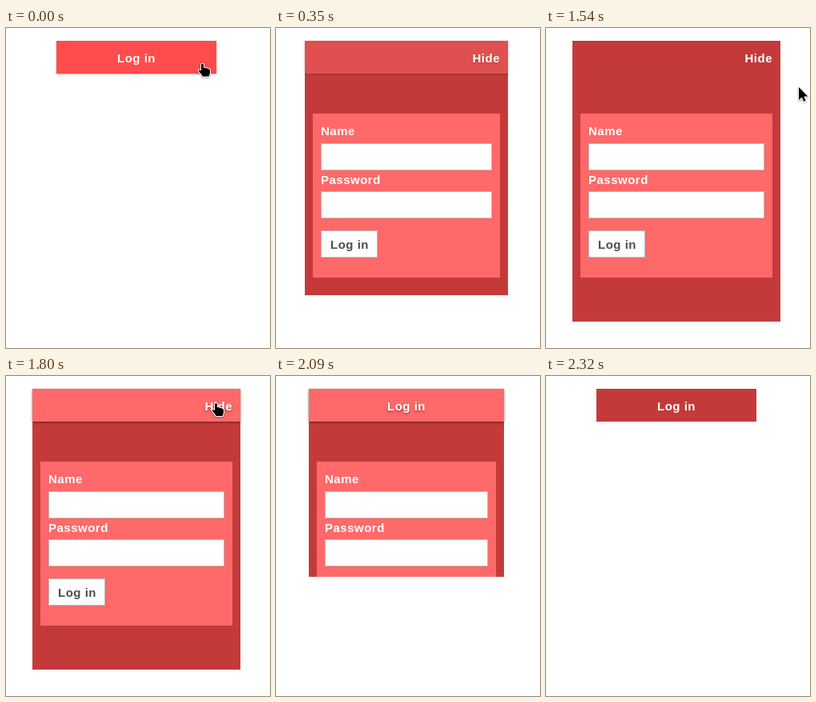
These frames come from a looping animation (330x400 px, 3860 ms). An HTML page:

```html
<!DOCTYPE html>
<html lang="en">
<head>
<meta charset="utf-8">
<title>Login panel</title>
<style>
  html, body { margin: 0; width: 100%; height: 100%; overflow: hidden; background: #fff; }
  body { position: relative; font: bold 15px/20px "Liberation Sans", Arial, sans-serif; letter-spacing: .5px; color: #fff; }
  div, svg { position: absolute; box-sizing: border-box; white-space: nowrap; }
  #panel { top: 16px; background: #c43a3a; overflow: hidden; }
  #header { top: 16px; height: 41px; padding: 12px 10px 0; }
  #form { left: 10px; right: 10px; top: 91px; height: 205px; background: #ff6969; }
  .label, .field, .button { left: 10px; }
  .field { right: 10px; height: 34px; background: #fff; border: 1px solid #bbb; }
  .button { top: 146px; width: 71px; height: 34px; padding: 7px 0 0 11px; background: #fff; border: 1px solid #bbb; color: #4d4d4d; }
  svg { left: 0; top: 0; }
  path { stroke: #fff; stroke-width: 2; stroke-linejoin: round; paint-order: stroke; filter: drop-shadow(0 1px 1px rgba(0,0,0,.35)); }
</style>
</head>
<body>
<div id="panel">
  <div id="form">
    <div class="label" style="top:12px">Name</div>
    <div class="field" style="top:37px"></div>
    <div class="label" style="top:73px">Password</div>
    <div class="field" style="top:97px"></div>
    <div class="button">Log in</div>
  </div>
</div>
<div id="header"></div>
<svg width="330" height="400">
  <path id="arrow" d="M0 0V16L3.8 12.4L6.2 17.8L8.6 16.8L6.3 11.6H11.4Z"/>
  <path id="hand" d="M-1.5 8.5V1C-1.5-.7 1.5-.7 1.5 1V5C2.5 4.3 4.1 4.5 4.4 5.5C5.5 4.9 6.8 5.3 7.1 6.2C8.5 5.9 9.5 6.8 9.5 8.1V10.5C9.5 12.5 8.5 13.5 8.1 15.5H0C-.5 13.5-2.5 12-4 9.8C-5.5 7.7-3.5 6.5-1.5 8.5Z"/>
</svg>
<script>
const LOOP = 3860;
// The picture only changes at these moments.
const STEPS = [0, 40, 80, 250, 300, 350, 390, 440,
  1540, 1580, 1630, 1670, 1710, 1760, 1800,
  1990, 2040, 2090, 2140, 2180, 2230, 2280, 2320];
const BRIGHT = [255, 77, 77], DARK = [196, 58, 58], LIT = [255, 105, 105];

const [panel, header, arrow, hand] =
  ["panel", "header", "arrow", "hand"].map(id => document.getElementById(id));

const progress = (t, from, to) => Math.min(1, Math.max(0, (t - from) / (to - from)));
const lerp = (a, b, p) => a + (b - a) * p;

// cubic-bezier(.25, .1, .25, 1)
function ease(x) {
  const bezier = (u, a, b) => 3 * u * (1 - u) ** 2 * a + 3 * u * u * (1 - u) * b + u ** 3;
  let low = 0, high = 1;
  for (let i = 0; i < 20; i++) {
    const mid = (low + high) / 2;
    if (bezier(mid, .25, .25) < x) low = mid; else high = mid;
  }
  return bezier(low, .1, 1);
}

const openness = (t, opens, closes) =>
  ease(progress(t, opens, opens + 200)) - ease(progress(t, closes, closes + 200));

function hoverAmount(t) {
  if (t < 250) return progress(t, 0, 80);
  if (t < 1000) return 1 - progress(t, 250, 440);
  if (t < 1900) return progress(t, 1600, 1800);
  return 1 - progress(t, 2110, 2320);
}

function cursorAt(t) {
  if (t < 350) {
    const p = progress(t, 0, 80);
    return [lerp(245.5, 241.5, p), lerp(45, 41, p)];
  }
  if (t < 1540 || t >= 1990) return null;
  const p = 1 - (1 - progress(t, 1540, 1800)) ** 2;
  return [lerp(316, 262.5, p), lerp(74, 34.5, p)];
}

function place(cursor, point, visible) {
  cursor.style.display = visible ? "" : "none";
  if (visible) cursor.setAttribute("transform", `translate(${point})`);
}

function draw(time) {
  const t = STEPS.findLast(step => step <= time);
  const width = Math.round(lerp(200, 260, openness(t, 224, 2053)));
  const height = Math.round(lerp(41, 351, openness(t, 227, 2043)));
  const left = Math.floor(163 - width / 2);
  for (const box of [panel, header]) {
    box.style.left = left + "px";
    box.style.width = width + "px";
  }
  panel.style.height = height + "px";

  const start = t < 250, lit = hoverAmount(t);
  const base = start ? BRIGHT : DARK;
  const opened = t >= 250 && t < 2040;
  header.textContent = opened ? "Hide" : "Log in";
  header.style.textAlign = opened ? "right" : "center";
  header.style.background = `rgb(${base.map((c, i) => Math.round(lerp(c, LIT[i], lit)))})`;
  header.style.boxShadow = `0 1px ${start ? 2 + lit : 3}px rgba(0,0,0,${start ? lerp(.3, .5, lit) : .5 * lit})`;
  header.style.textShadow = `0 2px 3px rgba(0,0,0,${.35 * lit})`;

  const point = cursorAt(t);
  const inside = point && point[0] < left + width && point[1] < 57;
  place(hand, point, inside);
  place(arrow, point, point && !inside);
}

const began = performance.now();
function tick() {
  draw((performance.now() - began) % LOOP);
  requestAnimationFrame(tick);
}
tick();
</script>
</body>
</html>
```
